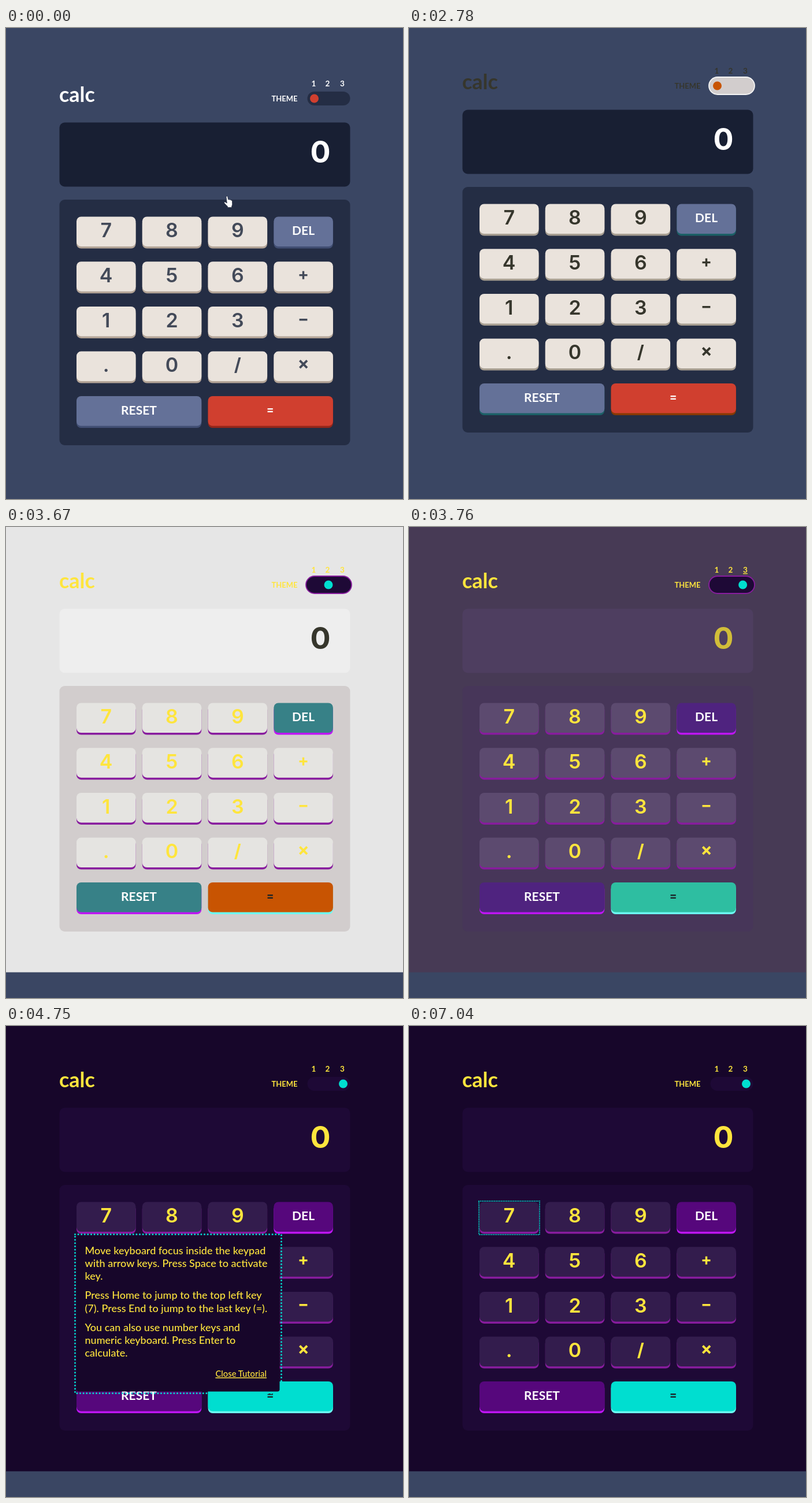
Animation of 687x815 px, one loop 8 s. Source, as an HTML page:

```html
<!DOCTYPE html>
<html lang="en">
<head>
<meta charset="utf-8">
<title>calc</title>
<style>
  html, body { margin: 0; width: 100%; height: 100%; overflow: hidden; background: #3a4663; }
  svg { display: block; width: 687px; height: 815px; }
  text { font-family: Lato, sans-serif; font-weight: 700; white-space: pre; }
  .digit { font-family: Inter, sans-serif; font-weight: 600; }
  .mid { text-anchor: middle; }
  .on { text-decoration: underline; text-decoration-thickness: 1px; text-underline-offset: 2px; }
  .tutorial { font-weight: 500; font-size: 18px; }
  .dots { fill: none; stroke: #00ded0; stroke-linecap: round; }
</style>
</head>
<body>
<svg id="stage" viewBox="0 0 687 815"></svg>
<script>
const LOOP = 8000;
const stage = document.getElementById('stage');

// "soft" colours fade during a theme change, "hard" ones switch at once.
const themes = [
  {
    soft: { bg: '#3a4663', pad: '#242d44', screen: '#181f33', key: '#eae3dc',
            func: '#647198', equal: '#d03f2f', value: '#ffffff' },
    hard: { text: '#ffffff', keyText: '#434a59', keyEdge: '#b3a497', funcEdge: '#414e73',
            equalEdge: '#93261a', equalText: '#ffffff', track: '#242d44', knob: '#d03f2f',
            ring: '#182037', gap: '#3a4663' },
    knobX: 533.5
  },
  {
    soft: { bg: '#e6e6e6', pad: '#d2cdcd', screen: '#eeeeee', key: '#e5e4e1',
            func: '#378187', equal: '#c85402', value: '#36362c' },
    hard: { text: '#36362c', keyText: '#36362c', keyEdge: '#a79e91', funcEdge: '#1b6066',
            equalEdge: '#873901', equalText: '#ffffff', track: '#d2cdcd', knob: '#c85402',
            ring: '#f4f4f4', gap: '#d2cdcd' },
    knobX: 558
  },
  {
    soft: { bg: '#17062a', pad: '#1e0936', screen: '#1e0936', key: '#331c4d',
            func: '#56077c', equal: '#00ded0', value: '#ffe53d' },
    hard: { text: '#ffe53d', keyText: '#ffe53d', keyEdge: '#881c9e', funcEdge: '#be15f4',
            equalEdge: '#6cf9f1', equalText: '#1a2327', track: '#1e0936', knob: '#00ded0',
            ring: '#881c9e', gap: '#1e0936' },
    knobX: 583.5
  }
];

function add(parent, tag, attrs, content) {
  const node = document.createElementNS('http://www.w3.org/2000/svg', tag);
  for (const name in attrs) node.setAttribute(name, attrs[name]);
  if (content !== undefined) node.textContent = content;
  return parent.appendChild(node);
}
const tone = name => `var(--${name})`;

function box(parent, x, y, width, height, rx, color, extra) {
  return add(parent, 'rect', { x, y, width, height, rx, fill: color, ...extra });
}
function label(parent, x, y, size, color, content, className = '') {
  return add(parent, 'text', { x, y, 'font-size': size, fill: color, class: className }, content);
}

// Baseline that puts the ink of a symbol around a given centre line.
const pen = document.createElement('canvas').getContext('2d');
function inkBaseline(symbol, size, center) {
  pen.font = `700 ${size}px Inter, sans-serif`;
  const ink = pen.measureText(symbol);
  return center + (ink.actualBoundingBoxAscent - ink.actualBoundingBoxDescent) / 2;
}
function symbolLabel(parent, x, center, size, color, symbol) {
  const node = label(parent, x, inkBaseline(symbol, size, center), size, color, symbol, 'digit mid');
  node.style.fontWeight = 700;
}

function button(parent, x, y, width, face, edge) {
  box(parent, x, y + 4, width, 51, 8, tone(edge));
  box(parent, x, y, width, 51.5, 8, tone(face));
}

box(stage, 0, 0, 687, 770.5, 0, tone('bg'));
const app = add(stage, 'g', {});

// Header
label(app, 92, 106, 36, tone('text'), 'calc');
label(app, 459.5, 104.5, 13, tone('text'), 'THEME');
const numbers = [532.5, 556.5, 582].map((x, i) =>
  label(app, x, 79, 13.5, tone('text'), i + 1, 'mid'));
const ring = box(app, 519, 85, 79, 30, 15, tone('gap'), { stroke: tone('ring'), 'stroke-width': 1.8 });
box(app, 521.5, 88, 74, 24, 12, tone('track'));
const knob = add(app, 'circle', { cy: 100, r: 7.5, fill: tone('knob') });

// Display
box(app, 92.5, 141.5, 503, 111, 9, tone('screen'));
const value = label(app, 544, 210.5, 52, tone('value'), '0', 'digit mid');
value.style.fontWeight = 700;

// Keypad
box(app, 92.5, 275, 503, 425, 9, tone('pad'));
const symbolSize = { '+': 28, '−': 28, '×': 30, '/': 31 };
['789D', '456+', '123−', '.0/×'].forEach((row, r) => [...row].forEach((key, c) => {
  const x = 122 + c * 113.8, y = 304.5 + r * 77.7, mid = x + 51.2;
  const del = key === 'D';
  button(app, x, y, 102.5, del ? 'func' : 'key', del ? 'funcEdge' : 'keyEdge');
  if (del) label(app, mid, 336, 21, '#fff', 'DEL', 'mid');
  else if (symbolSize[key]) {
    symbolLabel(app, mid, y + (key === '/' ? 24.5 : 22.8), symbolSize[key], tone('keyText'), key);
  } else label(app, mid, y + 35.7, 34, tone('keyText'), key, 'digit mid');
}));
button(app, 122, 615, 216.3, 'func', 'funcEdge');
button(app, 349.6, 615, 216.3, 'equal', 'equalEdge');
label(app, 230, 646.5, 21, '#fff', 'RESET', 'mid');
symbolLabel(app, 457.3, 639, 19, tone('equalText'), '=');

// Tutorial and focus outlines
function dotted(x, y, width, height, size, pitch) {
  return add(stage, 'rect', { x, y, width, height, class: 'dots',
    'stroke-width': size, 'stroke-dasharray': `0 ${pitch}` });
}
const popup = add(stage, 'g', {});
box(popup, 122, 363, 351.5, 269.5, 4, tone('bg'));
const paragraphs = [
  [394.5, 'Move keyboard focus inside the keypad', 'with arrow keys. Press Space to activate', 'key.'],
  [472.3, 'Press Home to jump to the top left key', '(7). Press End to jump to the last key (=).'],
  [527.7, 'You can also use number keys and', 'numeric keyboard. Press Enter to', 'calculate.']
];
for (const [top, ...lines] of paragraphs) {
  lines.forEach((line, i) => label(popup, 136.5, top + i * 22.2, 18, tone('text'), line, 'tutorial'));
}
label(popup, 406.7, 607, 14.8, tone('text'), 'Close Tutorial', 'mid on').style.fontWeight = 500;
const popupFocus = dotted(119.5, 360.5, 357, 275, 3, 5.6);
const closeFocus = dotted(352.5, 587.5, 108, 32, 3, 5.6);
const keyFocus = dotted(121, 303, 105, 58, 2, 3);

// Pointers, drawn with the tip at the origin
const outline = { fill: '#fff', stroke: '#20263a', 'stroke-width': 1, 'stroke-linejoin': 'round' };
const arrow = add(stage, 'path', { ...outline,
  d: 'M0 0V13.5L3.1 10.7L5.2 15.7L7.6 14.7L5.5 9.8H9.8Z' });
const hand = add(stage, 'path', { ...outline, 'stroke-width': .7, transform: 'translate(381 291)',
  d: 'M0 1.5Q0-.3 1.6 0Q2.6.3 2.8 1.8L3.6 6Q5 5 6 6.3Q7.5 5.7 8.4 7Q10.2 6.7 10.4 8.6L10.7 14Q10.5 16 9.6 17.3V19.5H2.5V17.8Q0 15.8-3.5 11.5Q-3.8 9.8-2 10L1.3 12Z' });

const show = (node, visible) => node.setAttribute('display', visible ? 'inline' : 'none');
const place = (node, x, y) => node.setAttribute('transform', `translate(${x} ${y})`);
const mix = (a, b, p) => a + (b - a) * p;
function mixColor(a, b, p) {
  const channel = (hex, i) => parseInt(hex.slice(i, i + 2), 16);
  return `rgb(${[1, 3, 5].map(i => Math.round(mix(channel(a, i), channel(b, i), p)))})`;
}
const fade = age => age < 90 ? 0 : age < 185 ? 0.77 : 1;

function paintTheme(t) {
  const index = t < 2780 ? 0 : t < 3670 ? 1 : 2;
  const p = index === 0 ? 1 : fade(t - (index === 1 ? 2780 : 3670));
  const to = themes[index], from = themes[Math.max(0, index - 1)];
  for (const name in to.soft) {
    stage.style.setProperty('--' + name, mixColor(from.soft[name], to.soft[name], p));
  }
  for (const name in to.hard) stage.style.setProperty('--' + name, to.hard[name]);
  knob.setAttribute('cx', mix(from.knobX, to.knobX, p));

  const focused = t >= 1580 && t < 4750;
  show(ring, focused);
  numbers.forEach((node, i) => node.classList.toggle('on', focused && p > 0 && i === index));
}

function render(t) {
  paintTheme(t);

  const step = t < 110 ? 0 : Math.min(5, 1 + Math.floor((t - 110) / 95));
  place(app, 0, 22 * (1 - step / 5));
  show(hand, step === 0);
  const resting = t >= 880 && t < 2780;
  show(arrow, resting || (step > 0 && step < 5));
  if (resting) place(arrow, 232, 62);
  else place(arrow, 381, 291 - step * 72);

  show(popup, t >= 4750 && t < 7040);
  show(popupFocus, t >= 4750 && t < 5860);
  show(closeFocus, t >= 5860 && t < 7040);
  show(keyFocus, t >= 7040);
}

const start = performance.now();
function tick() {
  render((performance.now() - start) % LOOP);
  requestAnimationFrame(tick);
}
tick();
</script>
</body>
</html>
```
